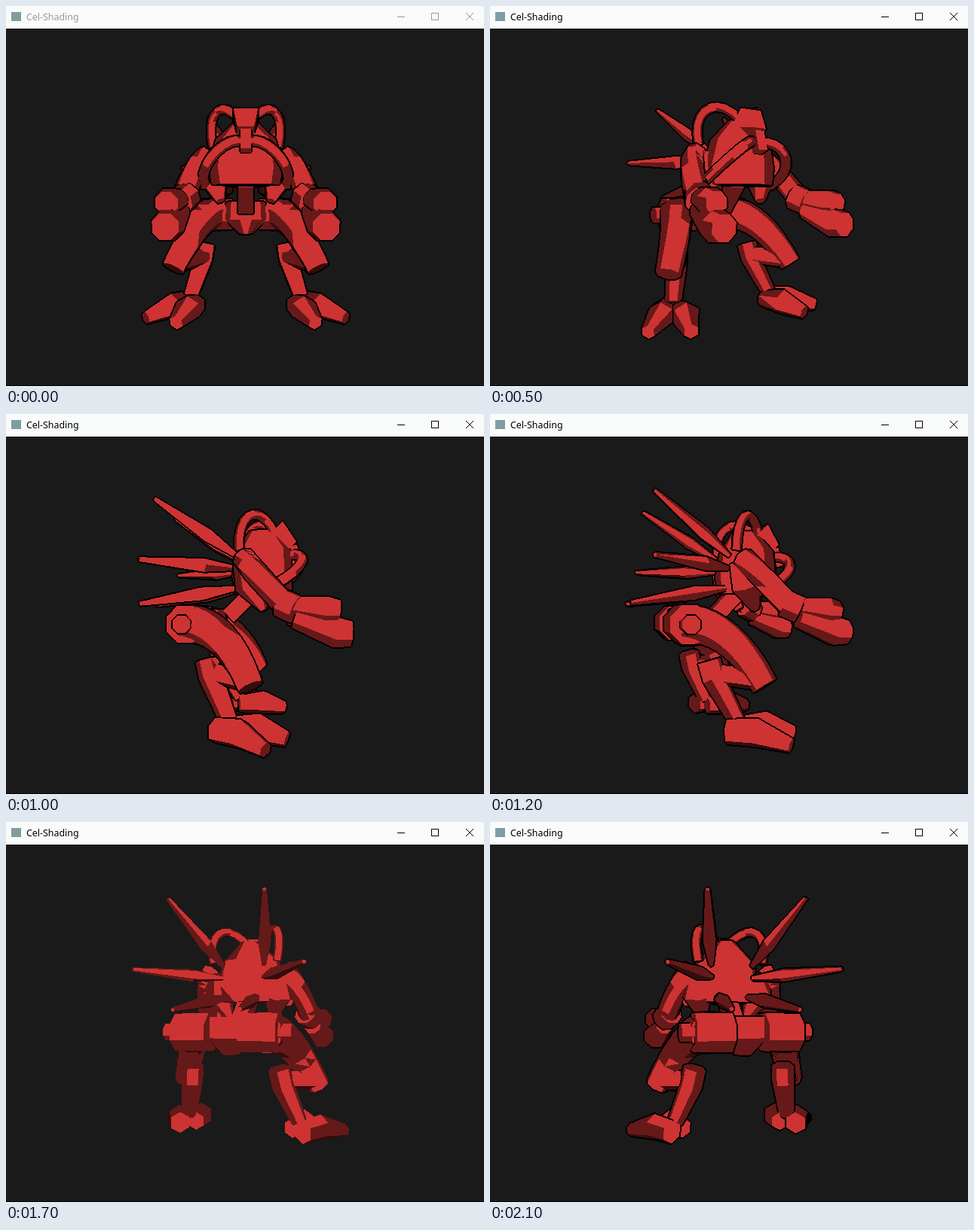
Write an HTML page with a canvas that moves like this. It is 634 px wide and 505 px high and loops after 2.9 s.

```html
<!DOCTYPE html>
<html lang="en">
<head>
<meta charset="utf-8">
<title>Cel-Shading</title>
<style>
  html, body { margin: 0; width: 100%; height: 100%; overflow: hidden; background: #1a1a1a; }
  #bar { position: absolute; left: 0; top: 0; width: 634px; height: 30px; background: #f8fbfa; color: #000; }
  #bar.idle { color: #999; }
  #bar i { position: absolute; left: 7px; top: 8px; width: 13px; height: 12px; background: #7f9ca2; }
  #bar span { position: absolute; left: 27px; top: 5px; font: 12.4px/19px "Noto Sans", "Open Sans", sans-serif; white-space: nowrap; }
  #bar svg { position: absolute; left: 0; top: 0; fill: none; stroke: currentColor; }
  canvas { position: absolute; left: 0; top: 30px; }
</style>
</head>
<body>
<div id="bar"><i></i><span>Cel-Shading</span>
  <svg width="634" height="30">
    <path shape-rendering="crispEdges" d="M519 14.5h10M564.5 9.5h9v9h-9z"/>
    <path d="M610 9l10 10M620 9l-10 10"/>
  </svg>
</div>
<canvas id="view" width="634" height="475"></canvas>
<script>
const W = 634, H = 475, CX = 318, CY = 237, EYE = 576;
const BACK = 0xff1a1a1a, BLACK = 0xff000000;
const TONES = [0xff3333cd, 0xff191966, 0xff0d0d33];
const UP = [0, 1, 0], FRONT = [0, 0, 1];

// ---- vectors ----
const sub = (a, b) => [a[0] - b[0], a[1] - b[1], a[2] - b[2]];
const dot = (a, b) => a[0] * b[0] + a[1] * b[1] + a[2] * b[2];
const cross = (a, b) => [a[1] * b[2] - a[2] * b[1], a[2] * b[0] - a[0] * b[2], a[0] * b[1] - a[1] * b[0]];
const unit = a => { const l = Math.hypot(...a) || 1; return a.map(v => v / l); };
const lerp = (a, b, t) => a + (b - a) * t;

// ---- mesh building: a part is a list of triangles ----
const parts = [];
const one = tris => parts.push(tris);
const pair = tris => parts.push(tris, tris.map(t => t.map(p => [-p[0], p[1], p[2]])));

function skin(rings) {
  const tris = [], n = rings[0].length;
  for (let k = 0; k < n; k++) {
    const q = (k + 1) % n;
    for (let i = 1; i < rings.length; i++) {
      const a = rings[i - 1], b = rings[i];
      tris.push([a[k], a[q], b[k]], [a[q], b[q], b[k]]);
    }
    for (const end of [rings[0], rings[rings.length - 1]]) tris.push([end[0], end[k], end[q]]);
  }
  return tris;
}

const around = (n, point) => Array.from({ length: n }, (_, k) => {
  const a = (k + .5) / n * 2 * Math.PI;
  return point(Math.cos(a), Math.sin(a));
});

// path of [x, y, z, radius]
function tube(path, sides = 8, ref = UP) {
  return skin(path.map((p, i) => {
    const t = unit(sub(path[i + 1] || p, path[i - 1] || p));
    const u = unit(cross(t, ref)), v = cross(t, u);
    return around(sides, (c, s) => [0, 1, 2].map(m => p[m] + p[3] * (u[m] * c + v[m] * s)));
  }));
}

// level rings of [y, z, half width, half depth]
const stack = levels => skin(levels.map(([y, z, w, d]) => around(12, (c, s) => [w * c, y, z + d * s])));

// cubic curve with a radius running from r0 to r1
const curve = (a, b, c, d, r0, r1 = r0, steps = 9) => Array.from({ length: steps + 1 }, (_, i) => {
  const t = i / steps, s = 1 - t;
  const p = [0, 1, 2].map(m => s * s * s * a[m] + 3 * s * s * t * b[m] + 3 * s * t * t * c[m] + t * t * t * d[m]);
  return [...p, lerp(r0, r1, t)];
});

const spike = (base, tip) => pair(tube([
  [...base, 3], [...base.map((v, i) => lerp(v, tip[i], .36)), 8.5], [...tip, 2.5]], 5));

// head, nose, neck, pelvis
one(stack([[110, 22, 13, 18], [84, 24, 39, 36], [50, 22, 48, 40], [28, 24, 44, 38]]));
one(tube([[0, 110, 38, 21], [0, 88, 59, 14]], 4, FRONT));
one(tube([[0, 90, 61, 9], [0, 66, 68, 9]], 4, FRONT));
one(tube([[0, 32, 12, 14], [0, -2, -22, 14]], 4, FRONT));
one(stack([[7, -54, 29, 27], [-18, -54, 31, 28], [-38, -52, 10, 16]]));

// hoses over the head and around the face
pair(tube(curve([-44, 80, -5], [-54, 125, -8], [-32, 142, 20], [-7, 107, 38], 5.5), 8, [1, 0, -.8]));
pair(tube(curve([-6, 78, 60], [-22, 80, 84], [-56, 50, 76], [-53, 28, 20], 6), 8, [1, -1.3, .7]));

spike([-28, 75, -10], [-57, 141, -107]);
spike([-28, 59, -12], [-100, 62, -112]);
spike([-20, 34, -12], [-38, 14, -131]);

// body side, upper arm, wrist, two barrels
pair(tube([[-40, 66, 2, 15], [-43, 36, 10, 20], [-32, 8, 24, 6]], 6, FRONT));
pair(tube(curve([-50, 68, 2], [-62, 60, 6], [-70, 38, 26], [-75, 12, 50], 14), 8));
pair(tube([[-71, 14, 46, 17], [-78, 6, 63, 17]]));
pair(tube([[-77, 10, 60, 11], [-85, 5, 98, 16], [-85, 4, 110, 13]]));
pair(tube([[-78, -4, 62, 12], [-84, -20, 108, 18], [-84, -21, 123, 15]]));

// hip, thigh, knee, shin, two toes
pair(tube([[-20, -11, -68, 24], [-64, -11, -68, 24]]));
pair(tube([[-64, -11, -69, 11], [-79, -11, -69, 11]]));
pair(tube(curve([-46, -11, -70], [-56, -8, -45], [-70, -26, -12], [-94, -80, 12], 25, 15)));
pair(tube([[-58, -70, -36, 11], [-88, -73, 6, 13]], 6));
pair(tube([[-57, -54, -43, 14], [-60, -74, -38, 14], [-75, -122, -15, 10]], 6, FRONT));
pair(tube([[-82, -132, -29, 14], [-98, -131, 0, 16], [-126, -140, 29, 8]], 6));
pair(tube([[-66, -132, -14, 12], [-74, -131, 20, 17], [-84, -140, 52, 9]], 6));

// ---- drawing ----
const ctx = document.getElementById('view').getContext('2d');
const image = ctx.createImageData(W, H);
const out = new Uint32Array(image.data.buffer);
const tone = new Uint32Array(W * H), dist = new Float32Array(W * H), owner = new Int16Array(W * H);

// offsets of the pixels within the ink's reach
const RIM = [];
for (let y = -2; y <= 2; y++) for (let x = -2; x <= 2; x++) {
  const d = Math.hypot(x, y);
  if (d && d <= 2) RIM.push(y * W + x);
}

// light sits at the eye, a little raised
function shade(p) {
  const n = unit(cross(sub(p[1], p[0]), sub(p[2], p[0])));
  const eye = unit(sub([0, 0, EYE], p[0]));
  const lit = Math.sign(dot(n, eye)) * dot(n, unit([eye[0], eye[1] + .25, eye[2]]));
  return TONES[lit > .62 ? 0 : lit > .1 ? 1 : 2];
}

function fill(p, id) {
  const [a, b, c] = p.map(v => {
    const w = 1 / (EYE - v[2]);
    return [CX + v[0] * EYE * w, CY - v[1] * EYE * w, w];
  });
  const area = (b[0] - a[0]) * (c[1] - a[1]) - (b[1] - a[1]) * (c[0] - a[0]);
  if (Math.abs(area) < 1e-4) return;
  const color = shade(p);
  const low = m => Math.floor(Math.min(a[m], b[m], c[m])), high = m => Math.ceil(Math.max(a[m], b[m], c[m]));
  const x0 = low(0), x1 = high(0), y0 = low(1), y1 = high(1);
  for (let y = y0; y <= y1; y++) for (let x = x0; x <= x1; x++) {
    const px = x + .5 - a[0], py = y + .5 - a[1];
    const u = (px * (c[1] - a[1]) - py * (c[0] - a[0])) / area;
    const v = ((b[0] - a[0]) * py - (b[1] - a[1]) * px) / area;
    if (u < 0 || v < 0 || u + v > 1) continue;
    const d = 1 / (a[2] + u * (b[2] - a[2]) + v * (c[2] - a[2])), i = y * W + x;
    if (d < dist[i]) { dist[i] = d; tone[i] = color; owner[i] = id; }
  }
}

function draw(deg, inked) {
  const c = Math.cos(deg * Math.PI / 180), s = Math.sin(deg * Math.PI / 180);
  const turn = p => [p[0] * c + p[2] * s, p[1], p[2] * c - p[0] * s];
  dist.fill(1e5); tone.fill(BACK); owner.fill(-1);
  parts.forEach((tris, id) => tris.forEach(t => fill(t.map(turn), id)));
  out.set(tone);
  if (inked) for (let y = 2; y < H - 2; y++) for (let x = 2; x < W - 2; x++) {
    const i = y * W + x;
    const edge = RIM.some(o => {
      const gap = dist[i] - dist[i + o];
      return gap > 16 || (gap > 5 && owner[i] !== owner[i + o]);
    });
    if (edge) out[i] = BLACK;
  }
  out.fill(BLACK, (H - 1) * W);
  ctx.putImageData(image, 0, 0);
}

// ---- timing: a steady turn in 100 ms steps, then a rest ----
const LOOP = 2900, STEP = 100, START = 200, RATE = 10.75, END = 197;
const bar = document.getElementById('bar');
let shown = '';
function tick() {
  const t = Math.floor(performance.now() % LOOP / STEP) * STEP;
  const deg = Math.min(END, Math.max(0, t - START) / STEP * RATE);
  const inked = t < 1400 || t >= 1900, key = deg + '/' + inked;
  bar.className = t < STEP ? 'idle' : '';
  if (key !== shown) { draw(deg, inked); shown = key; }
  requestAnimationFrame(tick);
}
tick();
</script>
</body>
</html>
```
